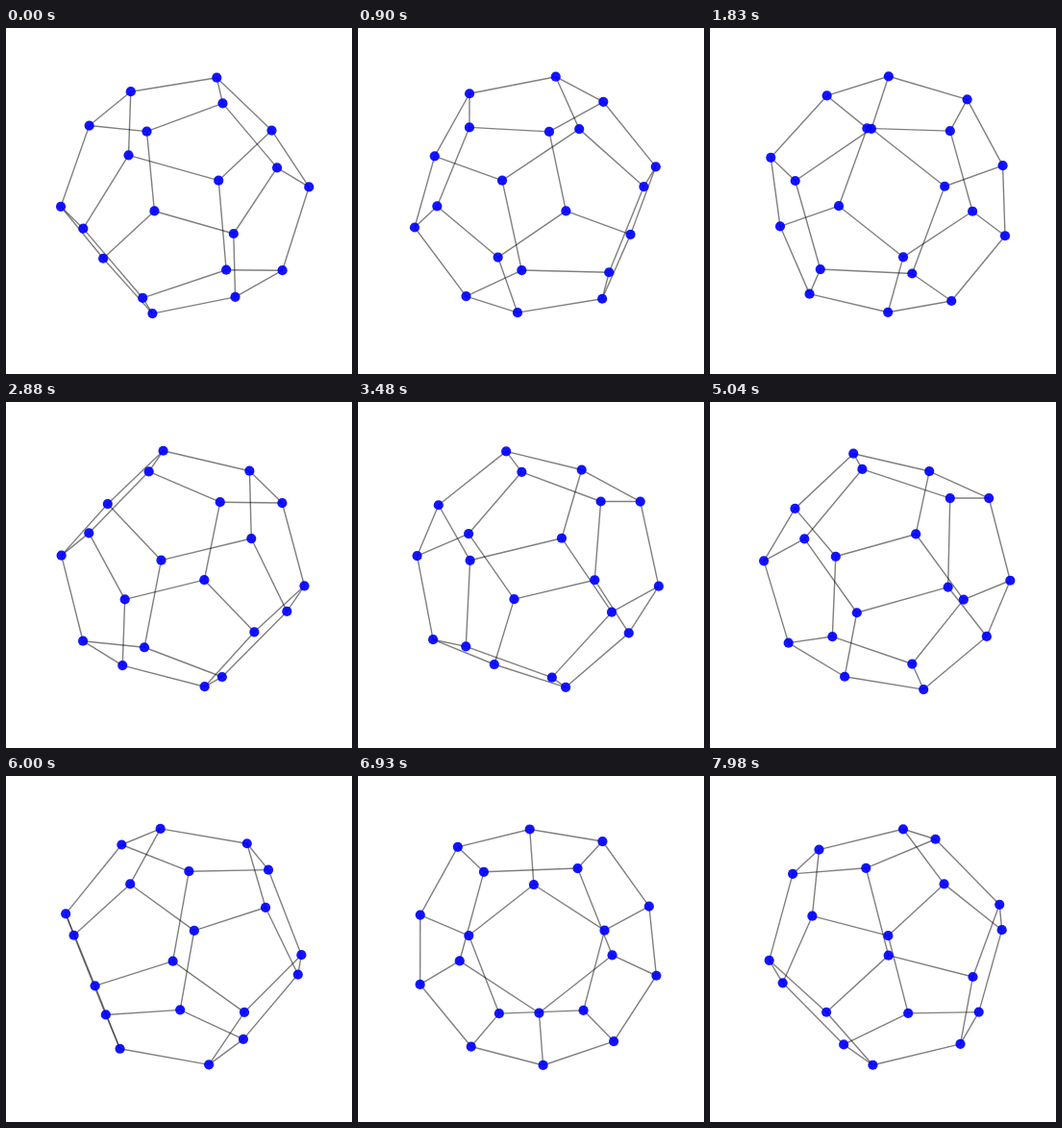
Recreate the animation shown at these times as an HTML page with a canvas. Size 360 px wide and 360 px high, loop 8 s.

```html
<!DOCTYPE html>
<html lang="en">
<head>
<meta charset="utf-8">
<title>Rotating dodecahedron</title>
<style>
  html, body { margin: 0; width: 100%; height: 100%; overflow: hidden; background: #fff; }
  canvas { display: block; width: 360px; height: 360px; }
</style>
</head>
<body>
<canvas id="stage" width="360" height="360"></canvas>
<script>
const ctx = document.getElementById('stage').getContext('2d');

const SIZE = 360, LOOP = 8000, STEP = 30, DEGREES_PER_STEP = 1;
const CENTER = { x: 185.5, y: 175.65 };
const PERSPECTIVE = 0.00056;
const DOT_RADIUS = 5.1;
const PHI = (1 + Math.sqrt(5)) / 2;
const SIGNS = [-1, 1];

// Where the solid's own three axes point at the start: right, up, towards the viewer.
const AXES = [
  [-23, 17.3, -69.05],
  [71, 12.9, -20.9],
  [-6.45, 70.9, 19.2]
];

// A cube's corners plus three golden rectangles form a regular dodecahedron.
const corners = [];
for (const a of SIGNS) for (const b of SIGNS) {
  for (const c of SIGNS) corners.push([a, b, c]);
  corners.push([0, a / PHI, b * PHI], [b * PHI, 0, a / PHI], [a / PHI, b * PHI, 0]);
}

const edges = [];
corners.forEach((p, i) => corners.slice(0, i).forEach((q, j) => {
  const length = Math.hypot(p[0] - q[0], p[1] - q[1], p[2] - q[2]);
  if (length < 2 / PHI + 0.01) edges.push([i, j]);
}));

const vertices = corners.map(corner =>
  [0, 1, 2].map(k => corner.reduce((sum, c, axis) => sum + c * AXES[axis][k], 0)));

// Turns a vertex about the vertical axis and projects it onto the stage.
function project([right, up, near], angle) {
  const cos = Math.cos(angle), sin = Math.sin(angle);
  const scale = 1 / (1 - PERSPECTIVE * (right * sin + near * cos));
  return {
    x: CENTER.x + (right * cos - near * sin) * scale,
    y: CENTER.y - up * scale
  };
}

function draw(ms) {
  const angle = Math.floor(ms / STEP) * DEGREES_PER_STEP * Math.PI / 180;
  const points = vertices.map(v => project(v, angle));

  ctx.clearRect(0, 0, SIZE, SIZE);

  ctx.strokeStyle = 'rgba(0, 0, 0, 0.5)';
  ctx.lineWidth = 1.4;
  for (const [i, j] of edges) {
    ctx.beginPath();
    ctx.moveTo(points[i].x, points[i].y);
    ctx.lineTo(points[j].x, points[j].y);
    ctx.stroke();
  }

  ctx.fillStyle = 'rgba(0, 0, 255, 0.92)';
  for (const { x, y } of points) {
    ctx.beginPath();
    ctx.arc(x, y, DOT_RADIUS, 0, 2 * Math.PI);
    ctx.fill();
  }
}

function tick() {
  draw(performance.now() % LOOP);
  requestAnimationFrame(tick);
}
tick();
</script>
</body>
</html>
```
